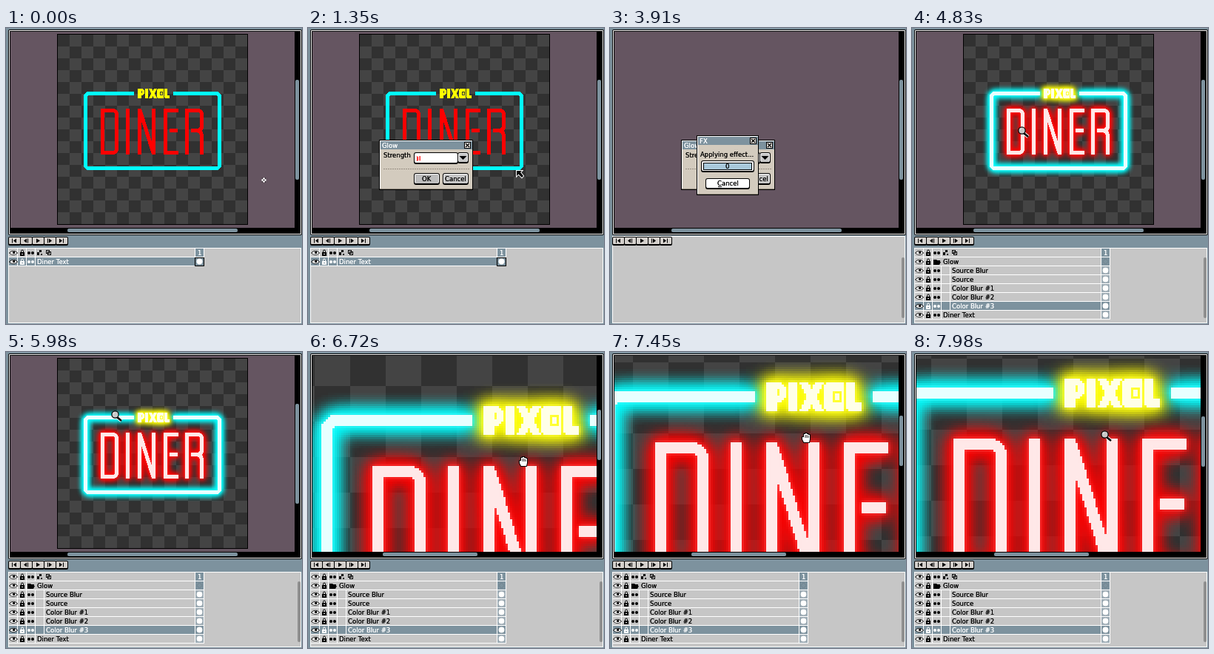
Recreate the animation shown at these times as an HTML page with a canvas. Size 400 px wide and 400 px high, loop 8000 ms.

```html
<!DOCTYPE html>
<html lang="en">
<head>
<meta charset="utf-8">
<title>Neon sign glow</title>
<style>
html, body { margin: 0; width: 100%; height: 100%; overflow: hidden; background: #7d929e; }
canvas { display: block; width: 400px; height: 400px; }
</style>
</head>
<body>
<canvas id="stage" width="400" height="400"></canvas>
<script>
const LOOP = 8000;
const SLATE = '#7d929e', MAUVE = '#655561', GREY = '#c6c6c6', SAND = '#d3cbbe';
const ctx = document.getElementById('stage').getContext('2d');

// ---------- helpers ----------
const rect = (color, x, y, w, h) => { ctx.fillStyle = color; ctx.fillRect(x, y, w, h); };

// Two passes firm up the small type
function text(str, x, y, color = '#000') {
  ctx.font = '8.5px "DejaVu Sans", sans-serif';
  ctx.fillStyle = color;
  ctx.fillText(str, x, y);
  ctx.fillText(str, x, y);
}

function rounded(color, x, y, w, h, r) {
  ctx.fillStyle = color;
  ctx.beginPath();
  ctx.roundRect(x, y, w, h, r);
  ctx.fill();
}

function shape(d, x, y, fill, line, width = 1) {
  const path = new Path2D(d);
  ctx.save();
  ctx.translate(x, y);
  if (line) { ctx.strokeStyle = line; ctx.lineWidth = width; ctx.stroke(path); }
  if (fill) { ctx.fillStyle = fill; ctx.fill(path); }
  ctx.restore();
}

// Linear track of [time, x, y] stops
function track(stops, t) {
  if (t <= stops[0][0]) return stops[0].slice(1);
  for (let i = 1; i < stops.length; i++) {
    const [t0, x0, y0] = stops[i - 1], [t1, x1, y1] = stops[i];
    if (t < t1) {
      const k = (t - t0) / (t1 - t0);
      return [Math.round(x0 + (x1 - x0) * k), Math.round(y0 + (y1 - y0) * k)];
    }
  }
  return stops[stops.length - 1].slice(1);
}

// ---------- sprite ----------
const SIZE = 256, LEFT = 70, TOP = 9;

function layer() {
  const c = document.createElement('canvas');
  c.width = c.height = SIZE;
  return c.getContext('2d', { willReadFrequently: true });
}

function drawSign() {
  const g = layer();
  g.translate(-LEFT, -TOP);
  g.lineWidth = 5;
  const line = (color, d) => { g.strokeStyle = color; g.stroke(new Path2D(d)); };
  const fill = (color, d) => { g.fillStyle = color; g.fill(new Path2D(d), 'evenodd'); };

  line('#0ff', 'M173 88.5H111.5a4 4 0 0 0-4 4V185.5a4 4 0 0 0 4 4H284.5a4 4 0 0 0 4-4V92.5a4 4 0 0 0-4-4H226');
  line('#f00', 'M130.5 111.5H144.5a5 5 0 0 1 5 5V163.5a5 5 0 0 1-5 5H130.5Z');
  line('#f00', 'M164.5 109V171');
  fill('#f00', 'M178 109H183L197 154V109h5V171h-5L183 126V171h-5Z');
  line('#f00', 'M233 111.5H215.5V168.5H233M221 138.5h11');
  line('#f00', 'M244.5 171V111.5H259q5.5 0 5.5 6V132q0 6.5-6 6.5H250M257 138.5q7.5 0 7.5 8V171');
  fill('#ff0', 'M179 82h5l3 2v5l-3 2h-1v4h-5v-12zM183 85v3h1v-3z');
  fill('#ff0', 'M188 82h4v13h-4z');
  fill('#ff0', 'M193 82h4l1.5 4 1.5-4h4l-3 6.5 3 6.5h-4l-1.5-4-1.5 4h-4l3-6.5z');
  fill('#ff0', 'M204 84l2-2h7v13h-7l-2-2zM208 86h4v5h-4zM209 87v3h2v-3z');
  fill('#ff0', 'M214 82h4v9h3v4h-5l-2-2z');

  // Hard pixel edges
  const img = g.getImageData(0, 0, SIZE, SIZE);
  for (let i = 3; i < img.data.length; i += 4) img.data[i] = img.data[i] > 127 ? 255 : 0;
  g.putImageData(img, 0, 0);
  return g.canvas;
}

function addGlow(sign) {
  const light = layer();
  light.drawImage(sign, 0, 0);
  light.globalCompositeOperation = 'source-atop';
  light.fillStyle = 'rgba(255,255,255,.91)';
  light.fillRect(0, 0, SIZE, SIZE);

  const g = layer();
  const blur = (src, r, alpha = 1) => {
    g.filter = `blur(${r}px)`;
    g.globalAlpha = alpha;
    g.drawImage(src, 0, 0);
  };
  g.drawImage(sign, 0, 0);
  for (const r of [5, 5, 5, 3, 3, 1]) blur(sign, r);
  g.filter = 'none';
  g.drawImage(light.canvas, 0, 0);
  blur(light.canvas, 1, .35);
  return g.canvas;
}

function onChecker(art) {
  const g = layer();
  for (let y = 0; y < 16; y++)
    for (let x = 0; x < 16; x++) {
      g.fillStyle = (x + y) % 2 ? '#444' : '#313131';
      g.fillRect(x * 16, y * 16, 16, 16);
    }
  g.drawImage(art, 0, 0);
  return g.canvas;
}

const sign = drawSign();
const plain = onChecker(sign), glowing = onChecker(addGlow(sign));

// ---------- editor view ----------
const VX = 6, VY = 5, VW = 384, VH = 265;
const PAN = [[6870, 0, 0], [7120, -20, -24], [7190, -23, -28], [7330, -23, -28], [7630, -31, -37]];

function drawView(t) {
  const zoom = t < 6180 ? 1 : t < 6240 ? 2 : 3;
  const pan = track(PAN, t);
  const x = Math.round(148.5 - (148.5 - LEFT) * zoom) + pan[0];
  const y = Math.round(86.5 - (86.5 - TOP) * zoom) + pan[1];

  rounded('#000', 3, 2, 397, 278, 2);
  rounded('#fff', 4, 3, 395, 276, 1);
  rect('#000', 5, 4, 393, 274);
  rect(MAUVE, VX, VY, VW, VH);

  if (t < 3150 || t >= 3970) {
    ctx.save();
    ctx.beginPath();
    ctx.rect(VX, VY, VW, VH);
    ctx.clip();
    ctx.imageSmoothingEnabled = false;
    rect('#000', x - 1, y - 1, SIZE * zoom + 2, SIZE * zoom + 2);
    ctx.drawImage(t < 3150 ? plain : glowing, x, y, SIZE * zoom, SIZE * zoom);
    ctx.restore();
  }

  const kx = VW / (VW + SIZE * zoom), ky = VH / (VH + SIZE * zoom);
  rounded(SLATE, Math.round(VX + (VW / 2 + VX - x) * kx), 271, Math.round(VW * kx), 5, 2);
  rounded(SLATE, 391, Math.round(VY + (VH / 2 + VY - y) * ky), 5, Math.round(VH * ky), 2);
}

// ---------- timeline ----------
const eye = (x, y) => {
  shape('M1 6Q6 1 11 6Q6 10.500 1 6z', x, y, '#fff', '#000', 1.6);
  rect('#000', x + 5, y + 4, 3, 3);
};
const lock = (x, y, color) => {
  rect(color, x + 3, y + 5, 6, 5);
  shape('M4.500 5.500V3.500q0-1.500 1.500-1.500t1.500 1.500V5.500', x, y, null, color);
  rect(color === '#000' ? '#fff' : SLATE, x + 5, y + 7, 2, 1);
};
const dots = (x, y, color) => shape('M1 6a2 2 0 1 0 4 0a2 2 0 1 0-4 0M6 6a2 2 0 1 0 4 0a2 2 0 1 0-4 0', x, y, color);
const folder = (x, y, color) => shape('M1 3h4l1 1h4v2h1l-2 4H1z', x, y, color);

function drawRow(i, name, { active, group, child, framed } = {}) {
  const y = 298 + i * 12, ink = active ? '#fff' : '#000';
  rect(active ? SLATE : GREY, 4, y, 252, 11);
  rect('#fff', 4, y + 11, 264, 1);
  for (const x of [15, 27, 39]) if (!group || x < 39) rect('#fff', x, y, 1, 11);
  if (child) rect('#fff', 51, y, 1, 11);
  eye(4, y);
  lock(16, y, ink);
  (group ? folder : dots)(28, y, ink);
  if (name) text(name, child ? 54 : 42, y + 8.5, ink);

  rect(framed ? '#000' : '#fff', 255, y, 13, 12);
  rect(active || group || !name ? SLATE : '#9fadb6', 256, y + (framed ? 1 : 0), 11, framed ? 10 : 11);
  if (!name) {
    rect('#000', 42, y + 5, 3, 4); rect('#000', 45, y + 2, 3, 3); rect('#000', 47, y + 7, 2, 2);
    ctx.strokeStyle = '#000'; ctx.lineWidth = 1;
    ctx.strokeRect(54.5, y + 2.500, 4, 4); ctx.strokeRect(56.5, y + 4.500, 4, 4);
    text('1', 259, y + 8.5, '#fff');
    return;
  }
  ctx.beginPath();
  ctx.arc(261.5, y + 5.5, group ? 3 : 4, 0, 7);
  ctx.strokeStyle = '#70838e'; ctx.lineWidth = 1; ctx.stroke();
  if (!group) { ctx.fillStyle = '#fff'; ctx.fill(); }
}

const TOOLS = ['M4 2h1v6H4zM10 2v6L6 5z', 'M8 2v6L4 5zM9 2h1v6H9z', 'M5 2v6l5-3z',
               'M4 2h1v6H4zM6 2v6l4-3z', 'M4 2v6l4-3zM9 2h1v6H9z'];
const GLOW_LAYERS = ['Source Blur', 'Source', 'Color Blur #1', 'Color Blur #2', 'Color Blur #3'];

function drawTimeline(t) {
  const empty = t >= 3150 && t < 3970, done = t >= 3970;
  rect('#fff', 3, 281, 396, 118);
  rect(GREY, 4, 282, 394, 116);
  if (!empty) {
    rect(SLATE, 3, 279, 397, 18);
    rect('#fff', 3, 297, 396, 1);
    drawRow(0, '');
    if (done) {
      drawRow(1, 'Glow', { group: true });
      GLOW_LAYERS.forEach((name, i) => drawRow(i + 2, name, { child: true, active: i === 4 }));
      drawRow(7, 'Diner Text');
    } else drawRow(1, 'Diner Text', { active: true, framed: true });
  }
  if (t >= 3580) rounded('#8f8f8f', 394, 310, 4, 82, 2);

  TOOLS.forEach((d, i) => {
    rounded('#000', 3 + i * 16, 282, 17, 12, 2);
    rounded('#d4d0cc', 4 + i * 16, 283, 15, 9, 1);
    shape(d, 4 + i * 16, 282.500, '#000');
  });
}

// ---------- dialogs ----------
function drawWindow(title, x, y, w, h) {
  rect('#000', x, y, w, h);
  rect('#fff', x + 1, y + 1, w - 2, h - 2);
  rect(SLATE, x + 2, y + 2, w - 3, 11);
  rect(SAND, x + 2, y + 13, w - 3, h - 15);
  rect('#8d8478', x + 1, y + h - 2, w - 2, 1);
  text(title, x + 4, y + 10.5, '#fff');
  const cx = x + w - 12;
  rect('#000', cx, y + 3, 9, 9);
  rect('#e8e4de', cx + 1, y + 4, 7, 7);
  shape('M2 2L7 7M7 2L2 7', cx, y + 3, null, '#000', 1.3);
}

function box(color, x, y, w, h) {
  rounded('#000', x, y, w, h, 3);
  rounded('#fff', x + 1, y + 1, w - 2, h - 3, 2);
  rounded(color, x + 2, y + 2, w - 4, h - 4, 1);
}

function drawGlowDialog(t) {
  drawWindow('Glow', 96, 151, 127, 68);
  text('Strength', 102, 175);
  box('#fff', 143, 168, 60, 16);
  rect('#f33', 147, 173, 5, 7);
  text(t < 2270 ? '1' : '3', 147, 179.5, '#fff');
  box(GREY, 202, 168, 15, 15);
  shape('M0 0h10l-5 5z', 204.500, 173, '#000');
  for (let x = 102; x < 218; x += 3) rect('#978e82', x, 190, 2, 1);
  box(t >= 2730 ? '#fff' : '#bdbdbd', 143, 196, 35, 16);
  text('OK', 154, 206.5);
  box(GREY, 182, 196, 35, 16);
  text('Cancel', 185, 206.5);
}

function drawList(pointerY) {
  rect('#000', 143, 184, 74, 52);
  rect('#fff', 144, 185, 72, 50);
  const hover = Math.max(0, Math.floor((pointerY - 186) / 12));
  for (let i = 0; i < 4; i++) {
    if (i === hover) rect('#f33', 145, 186 + i * 12, 70, 12);
    text(String(i + 1), 148, 195 + i * 12, i === hover ? '#fff' : '#000');
  }
}

function drawProgress() {
  drawWindow('FX', 117, 145, 84, 81);
  text('Applying effect...', 122, 173.5);
  box('#fff', 123, 179, 72, 16);
  rect('#000', 126, 182, 66, 10);
  rect('#a9c9db', 127, 183, 64, 8);
  text('0', 156, 190);
  box('#fff', 129, 203, 60, 15);
  text('Cancel', 145, 213);
  rect('#000', 146, 214, 5, 1);
}

// ---------- pointers ----------
const ARROW = [[990, 349, 206], [1400, 272, 190], [1690, 206, 176], [1810, 200, 182], [2200, 176, 213],
               [2390, 168, 213], [2450, 166, 211], [2610, 161, 204], [2730, 159, 203]];
const LENS = [[3970, 163, 200], [4360, 150, 150], [4420, 151, 149], [4730, 151, 149], [5100, 147, 115],
              [5500, 137, 84], [5620, 134, 90], [5740, 132, 94], [5860, 142, 84], [5980, 149, 86],
              [6240, 149, 86], [6660, 291, 148]];

const crosshair = (x, y) => {
  shape('M-3 0H-1M1 0H3M0-3V-1M0 1V3', x + .5, y + .5, null, '#fff', 2.500);
  shape('M-2.500-2.500h1M1.500-2.500h1M-2.500 2.500h1M1.500 2.500h1M-.5 0h1', x + .5, y + .5, null, '#000');
};
const arrow = (x, y) => shape('M1 1h7l-2 2 4 5-2 2-4.500-4.500L1 8z', x, y, '#000', '#fff', 2);
const lens = (x, y) => {
  shape('M1 2L7 7', x, y, null, '#fff', 4.500);
  shape('M1 2L7 7', x, y, null, '#000', 2.600);
  shape('M-5.500-1.500a4 4 0 1 0 8 0a4 4 0 1 0-8 0', x, y, '#c9c9c9', '#000', 2.500);
  shape('M-4-2.500l2-2', x, y, null, '#fff');
};
const hand = (x, y) => {
  shape('M-3 6L-5 2V-1h2V-5h2V-6h2v1h2v1h2V2L4 6z', x, y, '#fff', '#000', 2);
  shape('M-1-4V0M1-4V0M3-3V0', x, y, null, '#000', .8);
};

function drawPointer(t) {
  if (t < 710) crosshair(348, 205);
  else if (t < 3030) arrow(...track(ARROW, t));
  else if (t < 3970) return;
  else if (t < 6690) lens(...track(LENS, t));
  else if (t < 7860) {
    const [dx, dy] = track(PAN, t);
    hand(291 + dx, 148 + dy);
  } else lens(262, 113);
}

// ---------- loop ----------
function draw(t) {
  rect(SLATE, 0, 0, 400, 400);
  drawTimeline(t);
  drawView(t);
  if (t >= 710 && t < 3970) drawGlowDialog(t);
  if (t >= 1690 && t < 2270) drawList(track(ARROW, t)[1]);
  if (t >= 3030 && t < 3970) drawProgress();
  drawPointer(t);
}

const start = performance.now();
function tick() {
  draw((performance.now() - start) % LOOP);
  requestAnimationFrame(tick);
}
tick();
</script>
</body>
</html>
```
